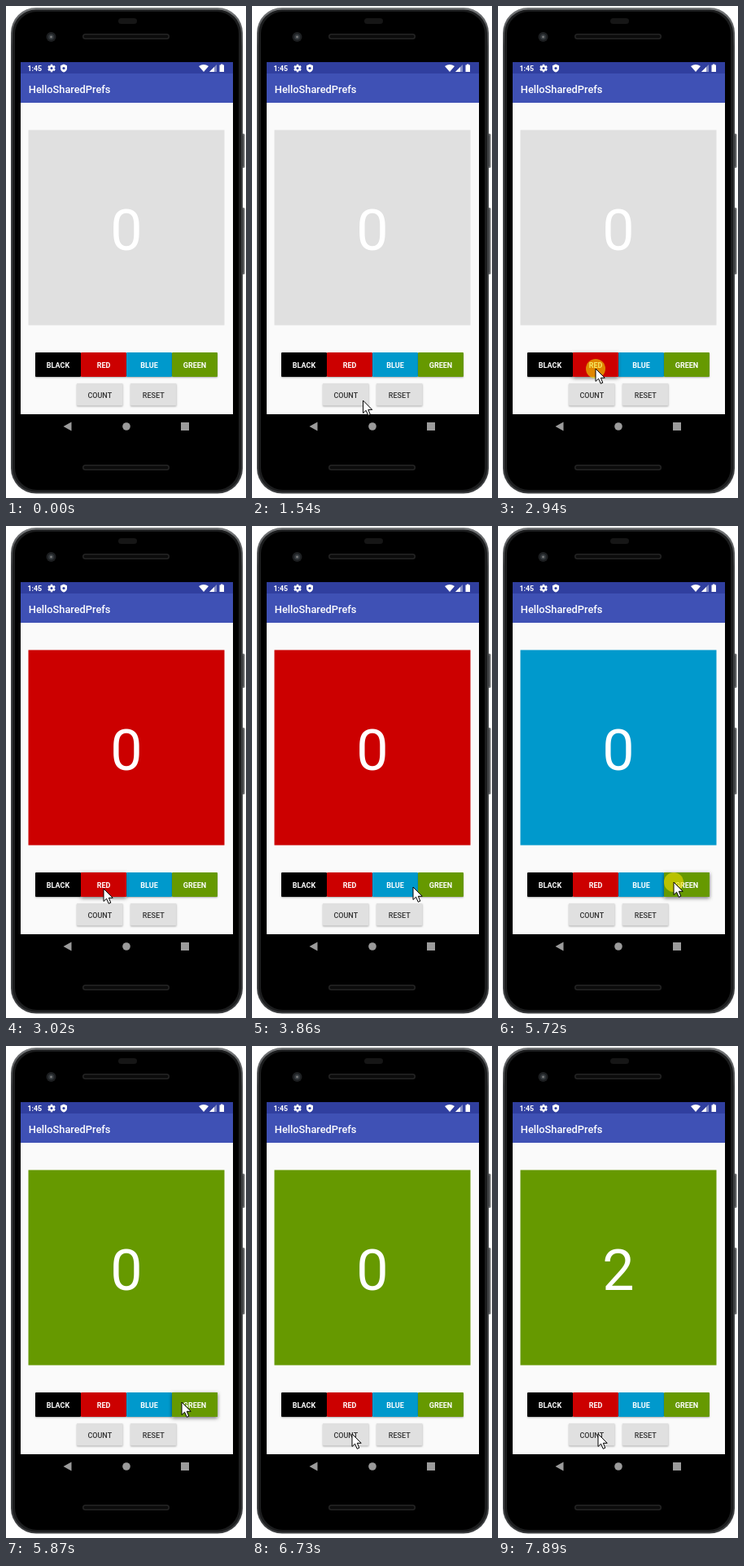
An HTML page with a canvas for the animation above (8000 ms loop, 295 by 605 pixels).

```html
<!DOCTYPE html>
<html>
<head>
<meta charset="utf-8">
<style>
html, body { margin: 0; width: 295px; height: 605px; overflow: hidden; background: #fff; }
canvas { display: block; }
</style>
</head>
<body>
<canvas id="stage" width="295" height="605"></canvas>
<script>
const ctx = document.getElementById('stage').getContext('2d');
const LOOP = 8000, HOLD = 150, LIFT = 280;

const colorButtons = [
  { label: 'BLACK', color: '#000000' },
  { label: 'RED', color: '#cc0000' },
  { label: 'BLUE', color: '#0099cc' },
  { label: 'GREEN', color: '#669900' }
];
const [, red, blue, green] = colorButtons;

const entry = { x: 224, y: 592 };
const moves = [
  { from: 990, to: 1690, x: 125, y: 471 },
  { from: 2350, to: 2700, x: 120, y: 446 },
  { from: 3440, to: 3860, x: 198, y: 444 },
  { from: 4840, to: 5560, x: 216, y: 438 },
  { from: 6140, to: 6730, x: 123, y: 477 }
];
// A tap without a color button presses COUNT
const taps = [
  { at: 2850, button: red }, { at: 4260, button: blue }, { at: 5640, button: green },
  { at: 7280 }, { at: 7740 }
];

function rect(x, y, w, h, color, r = 0) {
  ctx.fillStyle = color;
  ctx.beginPath();
  ctx.roundRect(x, y, w, h, r);
  ctx.fill();
}

function dot(x, y, r, color) {
  ctx.fillStyle = color;
  ctx.beginPath();
  ctx.arc(x, y, r, 0, 2 * Math.PI);
  ctx.fill();
}

function shape(d, x, y, color, outline) {
  const outlinePath = new Path2D(d);
  ctx.save();
  ctx.translate(x, y);
  ctx.fillStyle = color;
  ctx.fill(outlinePath);
  if (outline) {
    ctx.strokeStyle = outline;
    ctx.stroke(outlinePath);
  }
  ctx.restore();
}

function text(label, x, y, size, weight, color = '#fff', align = 'center') {
  ctx.font = `${weight} ${size}px Roboto, sans-serif`;
  ctx.textAlign = align;
  ctx.fillStyle = color;
  ctx.fillText(label, x, y);
}

function button(label, x, y, w, h, color, ink, weight, lifted) {
  ctx.save();
  ctx.shadowColor = 'rgba(0,0,0,.3)';
  ctx.shadowBlur = lifted ? 4 : 2;
  ctx.shadowOffsetY = lifted ? 1.5 : 1;
  rect(x, y, w, h, color, 1);
  ctx.restore();
  text(label, x + w / 2, y + h / 2 + 4, 9, weight, ink);
}

function sideButton(y, h) {
  rect(288, y, 5.5, h, '#6a6c6e', 1.5);
  rect(289, y + 2, 2.5, h - 4, '#2a2b2d');
}

function slot(y) {
  rect(94, y, 107, 7, '#242424', 3.5);
  rect(95.5, y + 1.5, 104, 4, '#0c0c0c', 2);
}

function phone() {
  sideButton(157, 42);
  sideButton(248, 82);
  const rim = ctx.createLinearGradient(0, 2, 0, 600);
  rim.addColorStop(0, '#77797b');
  rim.addColorStop(.08, '#3c3e40');
  rim.addColorStop(1, '#3c3e40');
  rect(6, 2, 285, 597.5, rim, 31);
  rect(8, 4.5, 281, 593, '#1c1d1e', 29);
  rect(11, 7, 275, 588, '#000', 27);
  slot(34);
  slot(564);
  rect(138, 15, 23, 7, '#161616', 3.5);
  dot(55.5, 38, 6, '#1d1f21');
  dot(55.5, 38, 3.5, '#33383c');
  dot(55.5, 38, 1.5, '#777');
}

function gear(x, y) {
  for (let i = 0; i < 6; i++) {
    ctx.save();
    ctx.translate(x, y);
    ctx.rotate(i * Math.PI / 3);
    rect(-1.2, -4.8, 2.4, 3, '#fff');
    ctx.restore();
  }
  dot(x, y, 3.6, '#fff');
  dot(x, y, 1.5, '#303f9f');
}

function statusBar() {
  rect(18, 69, 261, 14, '#303f9f');
  text('1:45', 26.5, 79.8, 8.8, 700, '#fff', 'left');
  gear(56, 76.5);
  shape('M0-5 4-3.3V0Q4 3.5 0 5Q-4 3.5-4 0V-3.3Z', 71, 76.5, '#fff');
  dot(71, 76.5, 1.6, '#303f9f');
  shape('M0 0L-6-7Q0-11 6-7Z', 243, 81, '#fff');
  shape('M0 0H9V-9Z', 250, 81, '#8790c8');
  shape('M0 0H6V-6Z', 250, 81, '#fff');
  shape('M0 0H5.5V-8.5H4V-9.5H1.5V-8.5H0Z', 262.5, 81, '#fff');
}

function navBar() {
  const gray = '#9b9b9b';
  shape('M0 0L10-5.5V5.5Z', 70.5, 517, gray);
  dot(148, 517, 4.8, gray);
  rect(215, 512, 10, 10, gray);
}

function pointerAt(t) {
  let { x, y } = entry;
  for (const move of moves) {
    const k = Math.min(1, Math.max(0, (t - move.from) / (move.to - move.from)));
    const ease = k * k * (3 - 2 * k);
    x += (move.x - x) * ease;
    y += (move.y - y) * ease;
  }
  return [x, y];
}

function pointer(t) {
  if (t < moves[0].from) return;
  const [x, y] = pointerAt(t);
  if (taps.some(({ at }) => t >= at && t < at + HOLD)) dot(x, y, 12, 'rgba(235,218,0,.62)');
  shape('M0 0V15.5L3.6 12.2 6.2 18.3 8.8 17.2 6.3 11.3H11.2Z', x, y, '#fff', '#000');
}

function draw(now) {
  const t = now % LOOP;
  const done = taps.filter(tap => t >= tap.at + HOLD);
  const chosen = done.filter(tap => tap.button).pop();
  const count = done.filter(tap => !tap.button).length;
  const pressed = taps.find(({ at }) => t >= at && t < at + LIFT)?.button;

  ctx.clearRect(0, 0, 295, 605);
  phone();
  rect(18, 119, 261, 383, '#fafafa');
  rect(18, 83, 261, 36, '#3f51b5');
  statusBar();
  text('HelloSharedPrefs', 27.8, 106.8, 12.8, 500, '#fff', 'left');
  navBar();

  rect(27.5, 152.5, 241, 240, chosen ? chosen.button.color : '#e0e0e0');
  text(count, 148, 300.3, 70, 400);

  const drawColor = (b, i) =>
    button(b.label, 36 + i * 56, 426, 56, 30, b.color, '#fff', 700, b === pressed);
  colorButtons.forEach(drawColor);
  if (pressed) drawColor(pressed, colorButtons.indexOf(pressed));
  ['COUNT', 'RESET'].forEach((label, i) =>
    button(label, 87 + i * 66, 464, 56.5, 27.5, '#e0e0e0', '#333', 500));
  pointer(t);
}

const start = performance.now();
function tick() {
  draw(performance.now() - start);
  requestAnimationFrame(tick);
}
tick();
</script>
</body>
</html>
```
